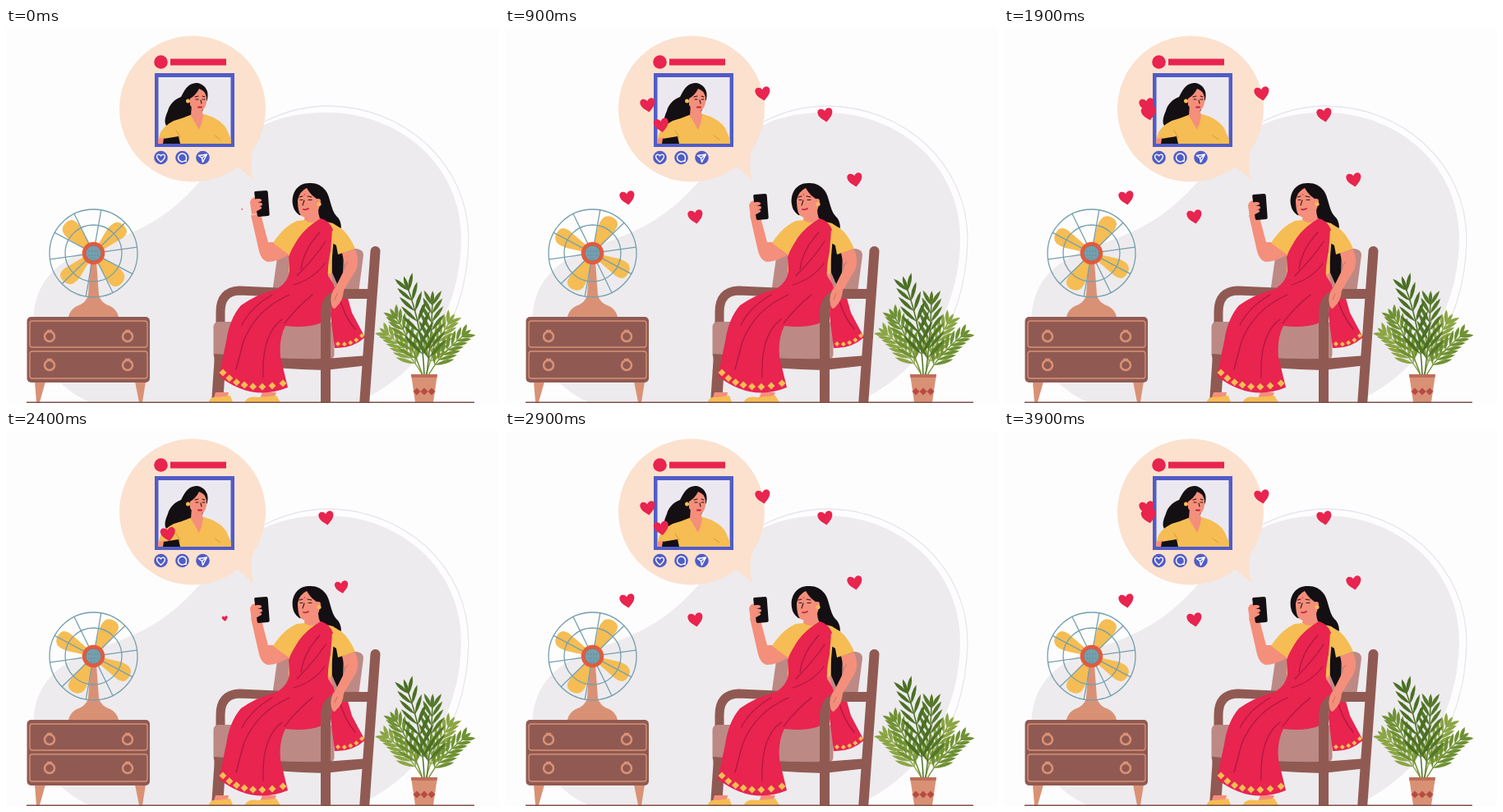
An HTML page that plays this animation: 600 by 457 pixels, repeating every 4000 ms.

```html
<!DOCTYPE html>
<html lang="en">
<head>
<meta charset="utf-8">
<title>Sharing a photo</title>
<style>
  html, body { margin: 0; width: 100%; height: 100%; overflow: hidden; background: #fefdfe; }
  svg { display: block; width: 100vw; height: 100vh; }
  .skin { fill: #f48f7b; } .hair { fill: #140f12; } .red { fill: #e8244f; }
  .gold { fill: #f5bd53; } .wood { fill: #905a53; } .pad { fill: #bd8985; }
  .clay { fill: #d99175; } .blue { fill: #515cc6; }
  .line { fill: none; stroke-linecap: round; stroke-linejoin: round; }
  .beam { stroke: #905a53; stroke-width: 12; }
  .fold { stroke: #ad1740; stroke-width: 1.2; }
  .trim { stroke: #d99175; stroke-width: 1.3; }
  .wire { stroke: #759fad; stroke-width: 1.3; }
  .icon { stroke: #fff; stroke-width: 1.4; }
  .face { stroke: #3a1517; stroke-width: 1.1; }
  .lips { stroke: #c41f3f; stroke-width: 1.8; }
</style>
</head>
<body>
<svg viewBox="0 0 600 457" preserveAspectRatio="none">
  <defs>
    <clipPath id="photo"><path d="M185 59h89v82h-89z"/></clipPath>
    <path id="heart" d="M0 9C-5 5-9.500 1-9.500-4C-9.500-9-3-10.500 0-5C3-10.500 9.500-9 9.500-4C9.500 1 5 5 0 9Z"/>
  </defs>

  <!-- backdrop -->
  <path fill="#edebee" d="M104 457C58 438 28 392 34 345C40 302 68 281 112 265C180 243 206 220 238 185C277 139 310 103 390 103C482 103 555 170 554 258C553 337 514 418 426 457Z"/>
  <path class="line" stroke="#e7e5ed" stroke-width="1.300" d="M315 114C340 101 365 95 393 95C485 96 563 165 563 258C562 315 546 362 516 402"/>

  <!-- speech bubble -->
  <g fill="#fbe1ce">
    <circle cx="227" cy="98.500" r="89"/>
    <path d="M302 143Q295 164 301 186Q292 176 280 168Z"/>
  </g>
  <circle class="red" cx="188.500" cy="41.500" r="8.300"/>
  <path class="red" d="M200 37.500h68v8h-68z"/>
  <path class="blue" d="M181 55h97v90h-97z"/>
  <path fill="#ebe9ef" d="M185.500 60h88v80.500h-88z"/>
  <g clip-path="url(#photo)">
    <path class="hair" d="M231 67C220 68 217 77 213 84C205 87 199 93 197 101C194 108 192 114 195 119L224 112L238 104L245 87C248 75 240 67 231 67Z"/>
    <path class="gold" d="M184 141L188 127Q196 114 214 110L227 105H241Q260 110 268 122L276 141Z"/>
    <path class="skin" d="M226 93L225 107Q231 117 235 124Q239 116 240 107L238 98Z"/>
    <path class="skin" d="M224 86Q231 82 235 74Q242 76 244 84Q245 97 238 101Q229 102 224 94Z"/>
    <circle class="gold" cx="221.500" cy="89" r="2.500"/>
    <path class="line face" d="M230 84l4-1M239 83l3 1M231 87h3M239 87h3M237 88l1 4"/>
    <path class="line lips" d="M234 96.500h4"/>
    <path class="line" stroke="#d89a35" d="M207 125l5 8M254 131l7 5"/>
    <path class="skin" d="M184 136l9-3 3 8h-12z"/>
    <path class="hair" d="M192 135l18-3 2 9h-21z"/>
  </g>
  <g class="blue">
    <circle cx="188.500" cy="158" r="8.300"/><circle cx="214.500" cy="158" r="8.300"/><circle cx="239.500" cy="158" r="8.300"/>
  </g>
  <use href="#heart" class="line icon" transform="translate(188.500 158.500) scale(.52)" style="stroke-width:2.600"/>
  <path class="line icon" d="M217.500 162A5 5 0 1 1 219.500 158.500L219 162.500ZM234.500 155.500l10-1.500-5 9.500-1-5ZM238.500 158.500l6-4.500"/>

  <!-- table -->
  <path class="clay" d="M35 431h13l-7 25h-4zM157 431h13l-4 25h-4z"/>
  <rect class="wood" x="25.500" y="352" width="149.500" height="80" rx="5"/>
  <g class="line trim">
    <rect x="29" y="357" width="143" height="32" rx="3"/><rect x="29" y="394" width="143" height="33" rx="3"/>
  </g>
  <g id="knobs" class="line" stroke="#d99175" stroke-width="2.500"></g>

  <!-- fan -->
  <path class="clay" d="M103 285h7l3 40q2 10 14 14 8 4 10 13H76q2-9 10-13 12-4 14-14Z"/>
  <g id="blades" class="gold"></g>
  <g class="line wire">
    <circle cx="106.500" cy="274.500" r="53.500"/><circle cx="106.500" cy="274.500" r="34.500"/>
    <path id="spokes"/>
  </g>
  <circle cx="106.500" cy="274.500" r="11.500" fill="#759fad" stroke="#e45a3d" stroke-width="4.500"/>
  <circle cx="106.500" cy="274.500" r="9.500" fill="none" stroke="#a9695f"/>
  <path class="line" stroke="#5a8799" stroke-width="1.600" stroke-dasharray="0 3.500" d="M101 272h12M101 277h12M104 281h7"/>

  <!-- chair, far side -->
  <path class="pad" d="M331 273Q332 268 340 268L427 269Q435 270 435 277L428 330H323Z"/>
  <path class="wood" d="M250 457L254 398H268L264 457Z"/>
  <path class="line beam" d="M449.500 272L436 460"/>
  <path class="line beam" style="stroke-width:11" d="M261 362V346Q261 321 284 320L330 322"/>
  <rect class="pad" x="252.500" y="358" width="147" height="46" rx="6"/>
  <path class="wood" d="M253 397q70 7 135 6l53-4v12l-53 6q-70-2-134-10z"/>

  <!-- woman -->
  <path class="hair" d="M371 189C354 188 347 202 349 215Q350 223 357 228L379 230Q388 237 397 240L408 244Q408 234 402 229C395 221 395 206 389 198Q382 189 371 189Z"/>
  <path class="skin" d="M364 222L363 235L351 243L384 257L386 236Q380 233 380 220Z"/>
  <path class="gold" d="M354 235L364 234Q370 240 382 234L398 238Q412 246 414 266L396 278V300H344V274L327 262Q336 245 354 235Z"/>
  <path class="skin" d="M386 299h10l2 18h-15z"/>
  <path class="hair" d="M397 262L411 270L410 300Q409 312 404 314L397 298Z"/>
  <path class="red" d="M396 316L412 315L421 347L437 377Q421 391 400 390L395 350Z"/>
  <path class="skin" d="M255 444h16l-2 10h-17zM312 444h17l-4 10h-17z"/>
  <path class="gold" d="M247 455q2-6 11-5l15-2 3 8h-29zM291 455q4-7 16-5l22-2 5 8h-43z"/>
  <path class="red" d="M383 232Q394 235 398 246L396 268Q391 289 392 302L399 313Q400 344 382 360Q365 366 340 363Q332 378 334 401L343 438Q299 456 259 424L268 382Q272 354 286 338Q304 325 330 318Q344 309 345 296L344 279Q354 249 383 232Z"/>
  <path class="line" stroke="#f5bd53" stroke-width="2.500" d="M398 248Q397 273 393 299"/>
  <path class="line fold" d="M382 249Q362 270 359 294M389 260Q376 280 354 302M388 287Q374 306 350 313M324 325Q298 340 287 362M345 325Q304 343 289 382L280 416M336 355Q311 373 313 426M373 325Q354 340 339 360M405 325Q411 351 425 367"/>
  <g id="hem" class="gold"></g>
  <path class="skin" d="M326 261L345 276Q330 285 318 285Q311 283 308 272L298 228L310 227L319 261Z"/>
  <path class="gold" d="M352 236Q337 243 325 262L344 276L357 254Z"/>

  <path class="skin" d="M355 210Q357 199 366 195Q372 206 382 210Q383 225 371 230Q360 233 357 225Q355 219 355 210Z"/>
  <circle class="skin" cx="380" cy="211" r="3"/><circle class="gold" cx="381" cy="214.500" r="2.600"/>
  <path class="line face" d="M357 206l4-1M367 205l5 1M358 209.500h3M368 209.500h4M363 210l-2 6"/>
  <path class="line lips" d="M362 221q3 1 6-1"/>
  <circle class="red" cx="363.500" cy="203" r=".8"/>

  <g id="phone">
    <path class="skin" d="M306 210Q299 209 297 216L299 231L311 230L314 217Z"/>
    <path class="hair" d="M303.500 203l13-1q2 0 2.200 2l2 27q0 2-2 2l-11 1q-2 0-2-2l-3.500-27q0-2 1.300-2z"/>
    <path class="skin" d="M298 217q3-5 9-5 5 0 4 3l-5 2q6-1 6 2 0 2-5 2 5 0 4 3-4 3-10 4z"/>
  </g>

  <!-- chair, near side -->
  <path class="line beam" d="M445 324H411Q389 325 389 348V460"/>
  <path class="skin" d="M409 274L425 270Q431 284 426 295L411 320Q410 333 402 340Q398 345 396 337Q393 325 402 314L413 292Z"/>
  <path class="gold" d="M397 239Q414 243 425 269L404 276Z"/>
  <path class="line" stroke="#cf6d5e" d="M412 290l4-5M400 331l3-7"/>

  <!-- plant -->
  <g id="plant"></g>
  <path class="clay" d="M493 422h32l-5 34h-22z"/>
  <path fill="#bd6d59" d="M493 422h32l-.6 4h-31z"/>
  <g id="band" fill="#b74b43"></g>
  <path stroke="#80514c" stroke-width="1.500" d="M25 456.300H570"/>
  <g id="hearts" class="red"></g>
</svg>

<script>
const $ = id => document.getElementById(id);
const rad = Math.PI / 180;

function add(parent, tag, attrs) {
  const node = document.createElementNS('http://www.w3.org/2000/svg', tag);
  for (const key in attrs) node.setAttribute(key, attrs[key]);
  return $(parent).appendChild(node);
}

// Point and heading on a quadratic curve [x0, y0, cx, cy, x1, y1]
function along([x0, y0, cx, cy, x1, y1], u) {
  const v = 1 - u;
  return {
    x: v * v * x0 + 2 * u * v * cx + u * u * x1,
    y: v * v * y0 + 2 * u * v * cy + u * u * y1,
    angle: Math.atan2(v * (cy - y0) + u * (y1 - cy), v * (cx - x0) + u * (x1 - cx)) / rad
  };
}

function diamonds(parent, curve, count, size) {
  for (let i = 0; i < count; i++) {
    const { x, y } = along(curve, i / (count - 1));
    add(parent, 'path', { d: `M${x} ${y - size}l${size} ${size}l${-size} ${size}l${-size} ${-size}z` });
  }
}

function frond(color, curve, length) {
  add('plant', 'path', {
    class: 'line', stroke: color, 'stroke-width': 1.5,
    d: `M${curve[0]} ${curve[1]}Q${curve.slice(2)}`
  });
  const leaf = (p, turn, size) => add('plant', 'path', {
    fill: color, d: `M0 0Q${size * .55} -5 ${size} 0Q${size * .55} 4 0 0`,
    transform: `translate(${p.x} ${p.y}) rotate(${p.angle + turn})`
  });
  for (let u = .22; u < .95; u += .12) {
    const size = length * (1.1 - .45 * u);
    for (const side of [-1, 1]) leaf(along(curve, u), side * (40 - 10 * u), size);
  }
  leaf(along(curve, .93), 0, length * .6);
}

for (const x of [53, 148]) for (const y of [376, 411]) {
  add('knobs', 'circle', { cx: x, cy: y, r: 6 });
  add('knobs', 'path', { d: `M${x - 2} ${y - 7}h4` });
}

for (let a = 0; a < 360; a += 90) {
  add('blades', 'path', {
    d: 'M8 -3L32 -10Q49 -13 50 -1Q51 12 38 10.500L8 4Z', transform: `rotate(${a})`
  });
}

let spokes = '';
for (let a = -8; a < 352; a += 36) {
  const at = r => `${106.5 + r * Math.cos(a * rad)} ${274.5 + r * Math.sin(a * rad)}`;
  spokes += `M${at(13)}L${at(53.5)}`;
}
$('spokes').setAttribute('d', spokes);

diamonds('hem', [264, 420, 290, 446, 337, 433], 8, 4.5);
diamonds('hem', [404, 385, 420, 387, 433, 375], 5, 3);
diamonds('band', [500, 443, 509, 443, 518, 443], 3, 4.5);

frond('#8ba544', [507, 423, 488, 390, 463, 372], 25);
frond('#8ba544', [511, 423, 522, 385, 540, 358], 27);
frond('#6f9133', [507, 423, 490, 375, 474, 352], 27);
frond('#6f9133', [514, 423, 530, 395, 558, 374], 25);
frond('#55782a', [512, 423, 518, 375, 519, 333], 31);
frond('#4b6f24', [509, 423, 507, 365, 488, 314], 33);

// Landing x, y, then start and duration of the flight in ms
const flights = [
  [390, 106, -10, 340], [203, 131.6, 20, 350], [426, 185, 60, 520], [232, 230, 335, 400],
  [149, 207, 400, 450], [174, 94, 420, 450], [314, 80, 440, 450]
];
const hearts = flights.map(() => add('hearts', 'use', { href: '#heart' }));

function draw(now) {
  const t = Math.floor(now % 4000 / 100) * 100;
  const cycle = t % 2000;
  $('blades').setAttribute('transform', `translate(106.500 274.500) rotate(${t * .18 - 43})`);
  $('phone').setAttribute('transform', `translate(0 ${-4 * Math.max(0, 1 - cycle / 300)})`);
  flights.forEach(([x, y, start, duration], i) => {
    const p = Math.min(1, Math.max(0, (cycle - start) / duration));
    const ease = 1 - (1 - p) ** 2;
    const drift = i === 1 ? cycle / 500 : 0;
    const px = 281 + (x - 7 * drift - 281) * ease;
    const py = 228 + (y - 7.3 * drift - 228) * ease;
    hearts[i].setAttribute('transform', `translate(${px} ${py}) rotate(-10) scale(${.95 * ease ** .8})`);
  });
}

const began = performance.now();
(function loop() {
  draw(performance.now() - began);
  requestAnimationFrame(loop);
})();
</script>
</body>
</html>
```
